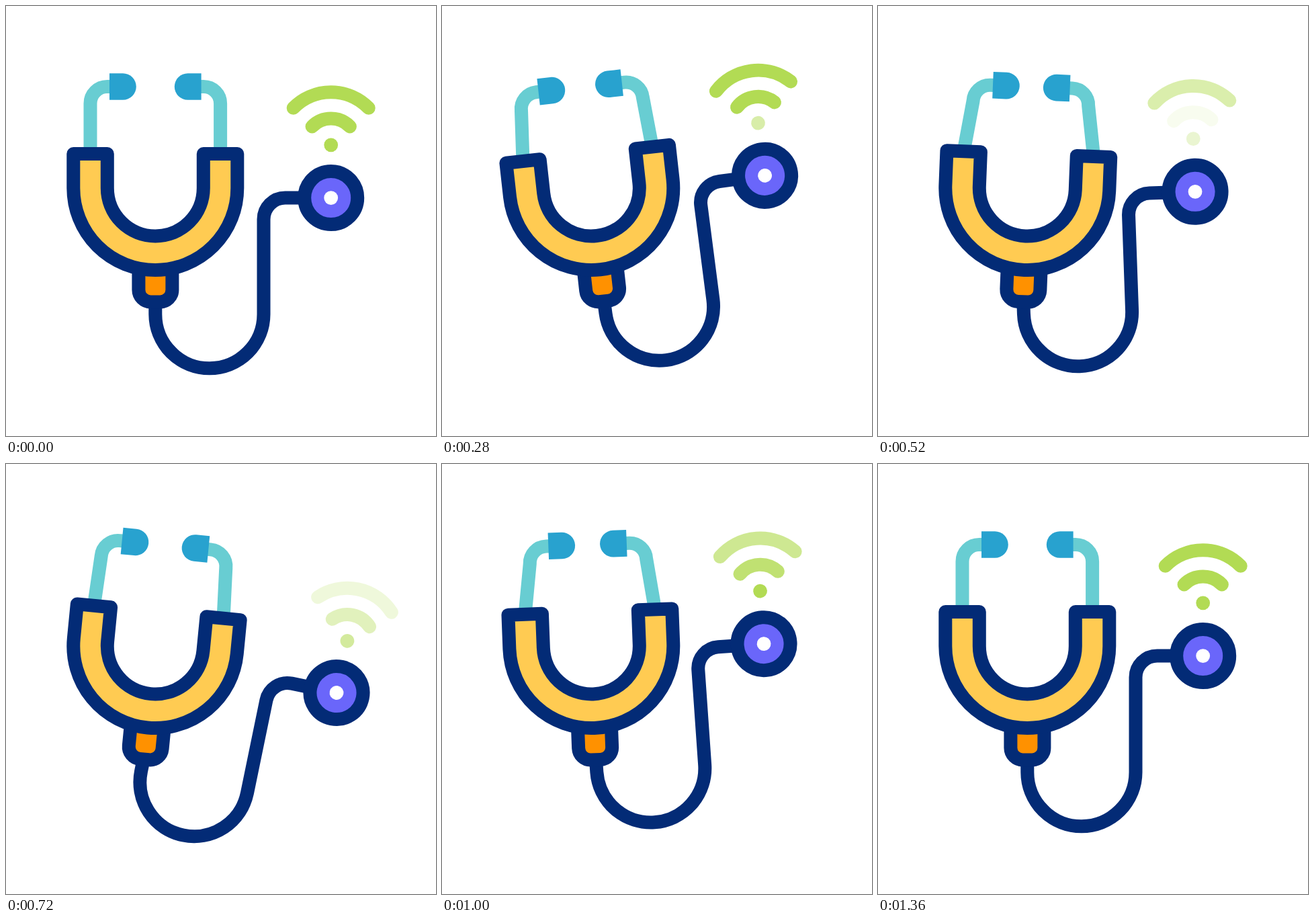
An HTML page for the animation above (1.64 s loop, 640 by 640 pixels).

```html
<!DOCTYPE html>
<html lang="en">
<head>
<meta charset="utf-8">
<title>Stethoscope</title>
<style>
  html, body { margin: 0; width: 100%; height: 100%; overflow: hidden; background: #fff; }
  svg { display: block; width: 100vw; height: 100vh; }
  .line { fill: none; stroke: #032b76; stroke-width: 20; stroke-linejoin: round; }
  .wave { fill: none; stroke: #b2db54; stroke-width: 20; stroke-linecap: round; }
</style>
</head>
<body>
<svg viewBox="0 0 640 640">
  <g id="body">
    <g id="hose">
      <path class="line" d="M222.3 440V458.7a80.6 80.6 0 0 0 161.2 0V317.5a32 32 0 0 1 32-32H445"/>
      <circle class="line" cx="483.7" cy="285.6" r="39.5" style="fill:#6a66fa"/>
      <circle cx="483.7" cy="285.6" r="10.4" fill="#fff"/>
      <path id="outer" class="wave" d="M427.7 151.8a78.4 78.4 0 0 1 112 0"/>
      <path id="middle" class="wave" d="M455.5 179.4a39.4 39.4 0 0 1 56.4 0"/>
      <circle id="dot" cx="483.7" cy="206.8" r="10.4" fill="#b2db54"/>
    </g>
    <g id="ear">
      <path id="arm" fill="none" stroke="#68cdd2" stroke-width="20"/>
      <path id="tip" fill="#28a2cf" d="M154 100.2h20a19.8 19.8 0 0 1 0 39.6h-20z"/>
    </g>
    <use href="#ear" transform="matrix(-1 0 0 1 444.6 0)"/>
    <path class="line" style="fill:#ff9100" d="M197.4 390V422.4a18 18 0 0 0 18 18h14a18 18 0 0 0 18-18V390"/>
    <path class="line" style="fill:#ffcb52" d="M100.3 220H150.8V271a71.5 71.5 0 0 0 143 0V220H344.3V271a122 122 0 0 1-244 0z"/>
  </g>
</svg>
<script>
  const LOOP = 1640, START = 120, STEP = 40, LAST = 31;
  const $ = id => document.getElementById(id);

  // Tracks: [step, value] pairs, with steps of 40 ms.
  const swing = [[0, 0], [5, -7], [13.25, 7], [20.2, -2.6], [27, 0]];
  const lag = [[2.8, 0], [7.6, -7], [15.7, 6.3], [23.5, -2.6], [30.5, 0]];
  const squeeze = [[2.4, 0], [6.8, 20], [13.6, 0], [18.6, 20], [25.4, 0]];
  const fades = {
    dot: [[2.4, 1], [5.6, 0], [22, 1]],
    middle: [[5.4, 1], [8.5, 0], [25, 1]],
    outer: [[8.4, 1], [11.5, 0], [28, 1]]
  };

  const linear = p => p;
  const sine = p => (1 - Math.cos(Math.PI * p)) / 2;

  function sample(track, k, ease) {
    if (k <= track[0][0]) return track[0][1];
    for (let i = 1; i < track.length; i++) {
      const [a, from] = track[i - 1], [b, to] = track[i];
      if (k < b) return from + (to - from) * ease((k - a) / (b - a));
    }
    return track[track.length - 1][1];
  }

  function draw(ms) {
    const step = Math.floor((ms % LOOP - START) / STEP);
    const k = step >= LAST ? LAST : Math.max(0, step);
    const dx = sample(squeeze, k, sine);

    $('body').setAttribute('transform', `rotate(${sample(swing, k, sine)} 222.3 271)`);
    $('hose').setAttribute('transform', `rotate(${sample(lag, k, sine)} 222.3 430)`);
    $('arm').setAttribute('d', `M125.5 220L${125.5 + dx} 145a25 25 0 0 1 25-25h5`);
    $('tip').setAttribute('transform', `translate(${dx} 0)`);
    for (const id in fades) $(id).setAttribute('opacity', sample(fades[id], k, linear));
  }

  const t0 = performance.now();
  function tick() {
    draw(performance.now() - t0);
    requestAnimationFrame(tick);
  }
  tick();
</script>
</body>
</html>
```
